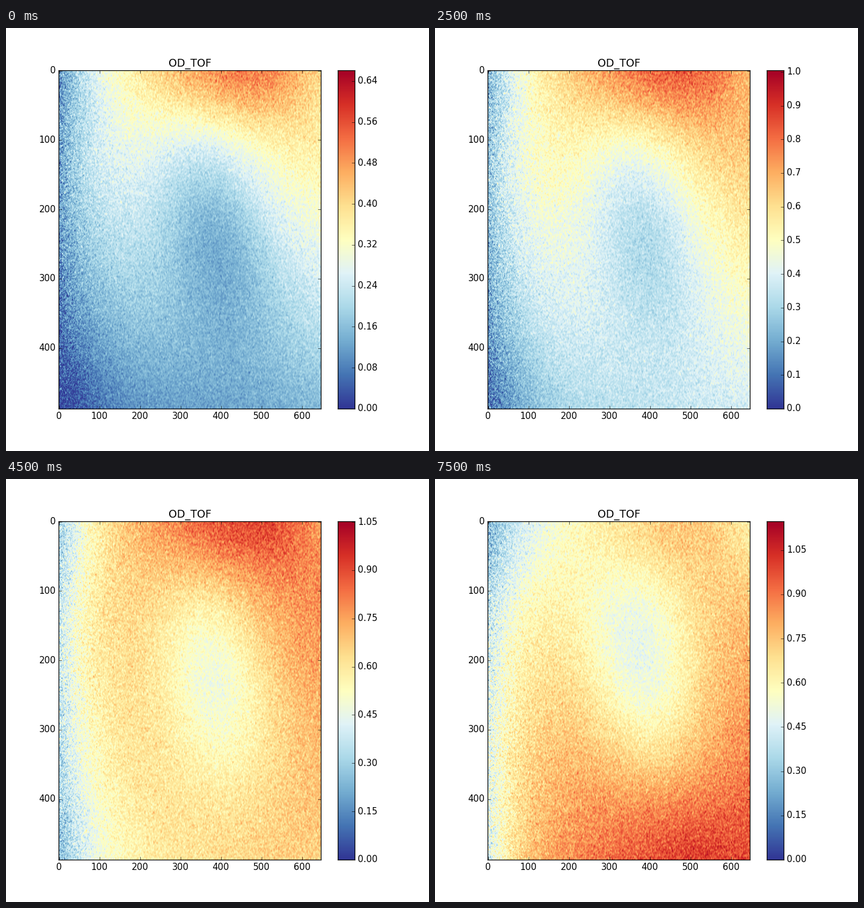
A matplotlib script that plays this animation: 700x700 px, repeating every 8 s.

```python
import numpy as np
import matplotlib.pyplot as plt
from matplotlib.animation import FuncAnimation

plt.style.use("classic")
plt.rcParams.update({
    "font.family": "DejaVu Sans",
    "figure.facecolor": "white",
    "figure.dpi": 87.5,
    "savefig.dpi": "figure",
})

FRAMES, INTERVAL = 16, 500
WIDTH, HEIGHT = 648, 488
CMAP = "RdYlBu_r"

x = np.arange(WIDTH)[None, :]
y = np.arange(HEIGHT)[:, None]


def blob(cx, cy, sx, sy):
    return np.exp(-((x - cx) / sx) ** 2 / 2 - ((y - cy) / sy) ** 2 / 2)


# Fixed shapes of the cloud; the hollow leans to the right going down.
HOLLOW = blob(385 + 0.25 * (y - 215), 215, 102, 120)
TOP_GLOW = blob(420, 0, 140, 55)
BOTTOM_GLOW = blob(480, HEIGHT, 110, 80)
CORNERS = (0.10 * blob(0, 0, 130, 70) + 0.06 * blob(0, HEIGHT, 90, 80)
           + 0.08 * blob(WIDTH, 0, 50, 50))
TILT = 0.06 * (x - 415) / 430
LEFT_FADE = np.exp(-x / 80)


def peak_density(step):
    return np.interp(step, [0, 3, 5, 9, 11, 13, 15],
                     [0.661, 0.894, 1.005, 1.052, 1.078, 1.131, 1.148])


def smooth_density(step):
    """Density relative to the peak: high at the top first, then below."""
    s = step / (FRAMES - 1)
    top = np.interp(step, [0, 10, 15], [0.62, 0.77, 0.57])
    bottom = 0.20 + 0.30 * (1 - np.cos(np.pi * s))
    level = top + (bottom - top) * y / HEIGHT + TILT
    level = level * (1 - (0.55 - 0.17 * s) * LEFT_FADE)
    return (level - (0.20 + 0.03 * s) * HOLLOW - CORNERS
            + (0.17 - 0.08 * s) * TOP_GLOW + 0.08 * s ** 2 * BOTTOM_GLOW)


def density(step):
    level = smooth_density(step)
    white = np.random.default_rng(step).normal(size=(HEIGHT, WIDTH))
    soft = sum(np.roll(white, k, axis=0) for k in (-1, 0, 1))
    soft = sum(np.roll(soft, k, axis=1) for k in (-1, 0, 1)) / 3
    noise = (0.02 + 0.025 * level) * soft + 0.09 * np.exp(-x / 60) * white
    return np.clip(level + noise, 0, 1)


fig = plt.figure(figsize=(8, 8))
ax = fig.add_axes([0.12485, 0.1, 0.62, 0.8])
image = ax.imshow(np.zeros((HEIGHT, WIDTH)), cmap=CMAP, vmin=0, vmax=1,
                  aspect="auto", interpolation="bilinear")
ax.set_xticks(range(0, WIDTH, 100))
ax.set_yticks(range(0, HEIGHT, 100))
ax.set_title("OD_TOF")

bar = fig.add_axes([0.7846, 0.1, 0.04, 0.8])
bar.imshow(np.linspace(0, 1, 256)[:, None], cmap=CMAP, origin="lower",
           extent=(0, 1, 0, 1), aspect="auto", interpolation="nearest")
bar.set_xticks([])
bar.yaxis.tick_right()


def draw(step):
    image.set_data(density(step))
    peak = peak_density(step)
    # The scale keeps at most ten intervals.
    gap = next(g for g in (0.08, 0.1, 0.15) if g > peak / 10.2)
    ticks = np.arange(0, peak, gap)
    digits = 1 if gap == 0.1 else 2
    bar.set_yticks(ticks / peak, [f"{t:.{digits}f}" for t in ticks])
    bar.set_ylim(0, 1)
    return [image]


anim = FuncAnimation(fig, draw, frames=FRAMES, interval=INTERVAL,
                     repeat=True, repeat_delay=0)
plt.show()
```
